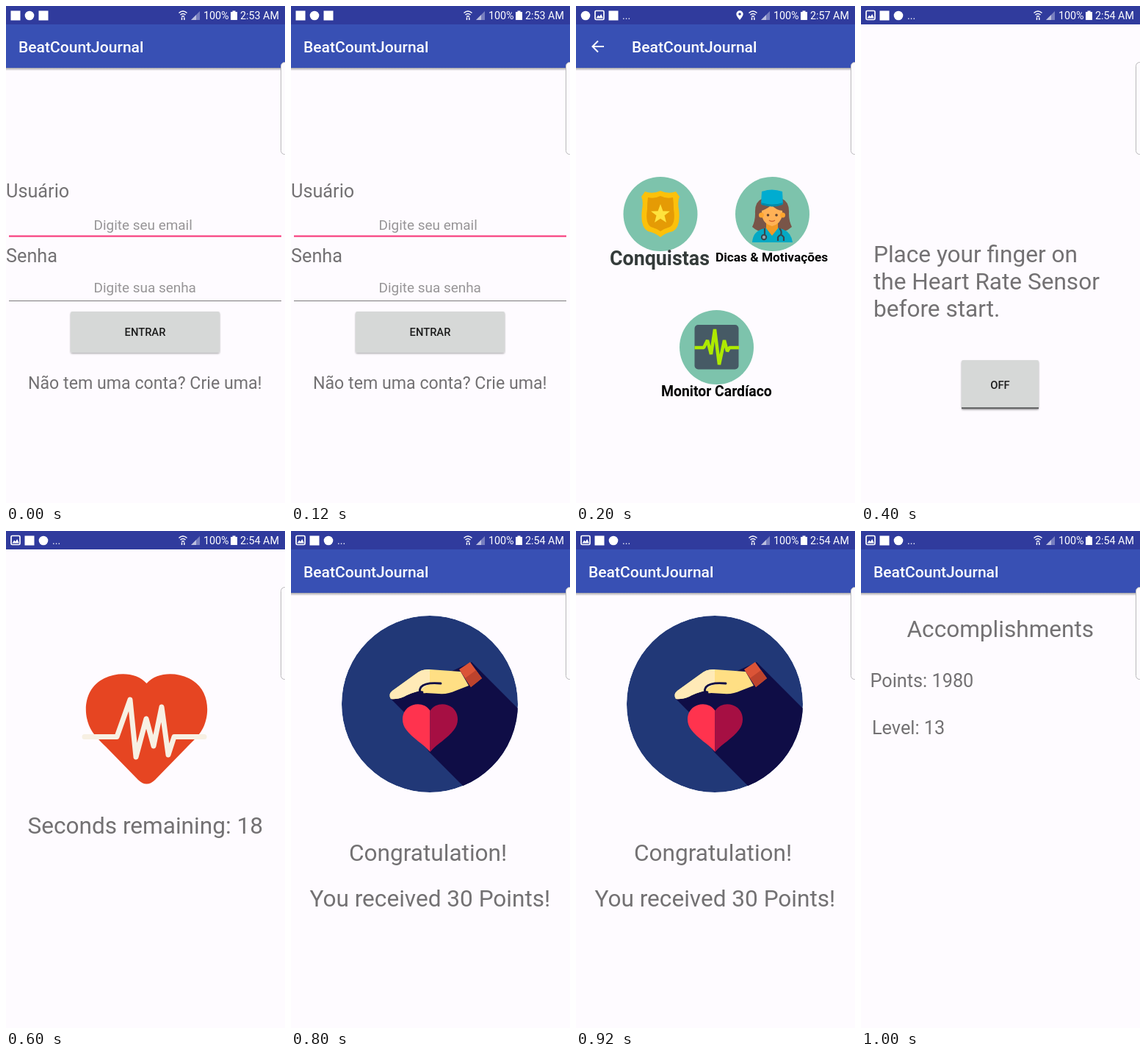
An HTML page for the animation above (1200 ms loop, 380 by 675 pixels).

```html
<!DOCTYPE html>
<html lang="pt">
<head>
<meta charset="utf-8">
<title>Pulse app tour</title>
<style>
html, body { margin: 0; width: 100%; height: 100%; overflow: hidden; background: #fefbff; }
svg { display: block; width: 380px; height: 675px; font-family: Roboto, sans-serif; }
[data-on] { display: none; }
.body { fill: #737173; }
.s18 { font-size: 18.95px; fill: #979597; }
.s22 { font-size: 23.16px; }
.s24 { font-size: 25.27px; }
.s30 { font-size: 31.58px; }
.title { font-size: 21.06px; font-weight: 500; fill: #fff; }
.button { font-size: 14.74px; font-weight: 500; fill: #1c1c1c; }
.status { font-size: 14.3px; fill: #fff; }
.label { font-weight: 700; }
</style>
</head>
<body>
<svg viewBox="0 0 380 675">
  <defs>
    <linearGradient id="shade" x2="0" y2="1">
      <stop stop-color="#000" stop-opacity=".34"/>
      <stop offset="1" stop-color="#000" stop-opacity="0"/>
    </linearGradient>
    <filter id="lift" x="-10%" y="-10%" width="120%" height="130%">
      <feDropShadow dx="0" dy="1.5" stdDeviation="1.2" flood-opacity=".35"/>
    </filter>
    <clipPath id="disc"><circle cx="189" cy="235" r="120"/></clipPath>
    <clipPath id="round"><circle cx="267.5" cy="283" r="50"/></clipPath>
    <g id="picture">
      <rect x="-6" y="-6" width="12" height="12" rx="1.5" fill="none" stroke="#fff" stroke-width="1.7"/>
      <path d="M-4.5 4 -1.8 0 0 2 2.2-1.5 4.8 4Z" fill="#fff"/>
    </g>
    <rect id="square" x="-6.5" y="-6.5" width="13" height="13" fill="#fff"/>
    <circle id="dot" r="6.3" fill="#fff"/>
  </defs>

  <rect width="380" height="675" fill="#fefbff"/>

  <!-- app bar -->
  <g data-on="0145">
    <rect y="84" width="380" height="4" fill="url(#shade)"/>
    <rect y="25" width="380" height="59" fill="#3850b4"/>
  </g>
  <text data-on="045" class="title" x="17" y="63">BeatCountJournal</text>
  <g data-on="1">
    <text class="title" x="76" y="63">BeatCountJournal</text>
    <path d="M38 55H23M30 47.5 22.5 55 30 62.5" fill="none" stroke="#fff" stroke-width="2"/>
  </g>

  <!-- status bar -->
  <rect width="380" height="25" fill="#303b9d"/>
  <g data-on="0">
    <use href="#square" x="13" y="13"/><use href="#dot" x="32" y="13"/><use href="#square" x="51" y="13"/>
  </g>
  <g data-on="1">
    <use href="#dot" x="13" y="13"/><use href="#picture" x="32" y="12.5"/><use href="#square" x="51" y="13"/>
    <path d="M223 19Q218.300 13.500 218.300 11A4.700 4.700 0 0 1 227.700 11Q227.700 13.500 223 19Z" fill="#fff"/>
    <circle cx="223" cy="11" r="1.8" fill="#303b9d"/>
  </g>
  <g data-on="2345">
    <use href="#picture" x="13" y="12.5"/><use href="#square" x="32" y="13"/><use href="#dot" x="51" y="13"/>
  </g>
  <text data-on="12345" class="status" x="63" y="18">...</text>
  <g fill="none" stroke="#fff" stroke-width="1.5">
    <path d="M235.500 9.500Q241 4.500 246.500 9.500M237.500 12Q241 9 244.500 12M239.200 14.300Q241 13 242.800 14.300"/>
    <path d="M239.500 15.500V19M242.800 15.500V19"/>
  </g>
  <path d="M252 19 264 7V19Z" fill="#fff" opacity=".35"/>
  <path d="M252 19 259 12V19Z" fill="#fff" opacity=".5"/>
  <text class="status" x="269" y="18">100%</text>
  <path d="M306 8H308.500V6.500H312.500V8H315V19H306Z" fill="#fff"/>
  <text id="clock" class="status" x="319" y="18"></text>

  <!-- sign-in -->
  <g data-on="0" class="body">
    <text class="s24" x="0" y="260">Usuário</text>
    <text class="s18" x="119.500" y="304">Digite seu email</text>
    <rect x="4" y="311.500" width="371" height="2.200" fill="#f8407f"/>
    <text class="s24" x="0" y="348">Senha</text>
    <text class="s18" x="119.500" y="389">Digite sua senha</text>
    <rect x="4" y="400" width="371" height="1" fill="#7c7a7c"/>
    <rect x="88" y="415" width="203" height="55.500" rx="2" fill="#d6d8d7" filter="url(#lift)"/>
    <text class="button" x="189.500" y="448" text-anchor="middle">ENTRAR</text>
    <text class="s22" x="30" y="519.500">Não tem uma conta? Crie uma!</text>
  </g>

  <!-- menu -->
  <g data-on="1">
    <g fill="#7dc3ac">
      <circle cx="115" cy="282.500" r="50.500"/>
      <circle cx="267.500" cy="282.500" r="50.500"/>
      <circle cx="191.500" cy="463.500" r="50.500"/>
    </g>
    <path d="M94 252Q104 256 115 251Q126 256 136 252L141 259Q138 265 140 276Q143 300 132 306Q122 308 115 314Q108 308 98 306Q87 300 90 276Q92 265 89 259Z" fill="#fcc10b"/>
    <path d="M98 260Q107 262 115 258Q123 262 132 260Q133 267 133 276Q136 295 128 300Q121 302 115 306Q109 302 102 300Q94 295 97 276Q97 267 98 260Z" fill="#e59b05"/>
    <path d="M115 269 118.400 278.500 128 278.700 120.500 284.500 123 294 115 288.700 107 294 109.500 284.500 102 278.700 111.600 278.500Z" fill="#ffe23d"/>

    <g clip-path="url(#round)">
      <path d="M253 262Q243 266 244 282Q244 292 240 300Q250 309 267 309Q284 309 294 300Q290 292 290 282Q291 266 281 262Z" fill="#795548"/>
      <path d="M240 321Q241 307 253 303L260 301H274L281 303Q293 307 295 321Z" fill="#04a9c4"/>
      <path d="M259 293H275V302L267 312 259 302Z" fill="#f29a25"/>
      <path d="M253 270H281V284Q279 296 267 299Q255 296 253 284Z" fill="#ffb156"/>
      <circle cx="252.500" cy="284" r="3.500" fill="#ffa52e"/>
      <circle cx="281.500" cy="284" r="3.500" fill="#ffa52e"/>
      <path d="M253 278Q262 275 266 270Q272 277 281 278V268H253Z" fill="#795548"/>
      <path d="M253 252Q267 247 281 252L282 269Q267 274 252 269Z" fill="#00acd0"/>
      <path d="M252 267Q267 272 282 267L281 270Q267 275 253 270Z" fill="#0089a8"/>
      <g fill="#5f402f"><circle cx="261.500" cy="284" r="1.800"/><circle cx="273" cy="284" r="1.800"/></g>
      <path d="M263 291Q267 294 271 291" fill="none" stroke="#d3612c" stroke-width="1.500"/>
      <path d="M257 302V311M277 302Q281 306 279 311M275 319V314Q279 308 283 314V319" fill="none" stroke="#37474f" stroke-width="2.200"/>
      <circle cx="256" cy="314" r="3.200" fill="#90a4ae" stroke="#37474f" stroke-width="2"/>
    </g>

    <rect x="161.500" y="433" width="60" height="60.500" rx="5" fill="#465a65"/>
    <path d="M161.500 464H174L179 454 184 473 189 439 195 487 202 454 206 469 209 464H222" fill="none" stroke="#aeea00" stroke-width="4.500" stroke-linejoin="bevel"/>

    <text class="label" x="46" y="352" font-size="26.800" fill="#343b3a">Conquistas</text>
    <text class="label" x="190" y="346.500" font-size="17.300">Dicas &amp; Motivações</text>
    <text class="label" x="116" y="529.500" font-size="19.400">Monitor Cardíaco</text>
  </g>

  <!-- sensor prompt -->
  <g data-on="2" class="body">
    <g class="s30">
      <text x="17" y="347.500">Place your finger on</text>
      <text x="17" y="384.500">the Heart Rate Sensor</text>
      <text x="17" y="421.500">before start.</text>
    </g>
    <rect x="137" y="481" width="105" height="66" rx="2" fill="#d6d8d7" filter="url(#lift)"/>
    <rect x="137" y="545" width="105" height="2.200" fill="#666768"/>
    <text class="button" x="189.500" y="520" text-anchor="middle">OFF</text>
  </g>

  <!-- measuring -->
  <g data-on="3">
    <path d="M191.500 207C178 192 153 191 134 200C109 212 104 241 113 264C118 276 126 283 136 293L180 338Q191.500 349 203 338L247 293C257 283 265 276 270 264C279 241 274 212 249 200C230 191 205 192 191.500 207Z" fill="#e64522"/>
    <path d="M107 279.500H151L169 229 177 307 191 255 201 292 212 239 221 304 229 279.500H270" fill="none" stroke="#f7f0e3" stroke-width="7" stroke-linecap="round" stroke-linejoin="round"/>
    <text class="body s30" x="29.500" y="411">Seconds remaining: 18</text>
  </g>

  <!-- reward -->
  <g data-on="4">
    <g clip-path="url(#disc)">
      <circle cx="189" cy="235" r="120" fill="#213877"/>
      <path d="M136 228 155 247 188 300 257 369H330V262L246 178Z" fill="#0f0d46"/>
    </g>
    <path d="M136 228Q132 222 138 217L170 194Q178 187 189 188L231 191 242 210 224 217Q214 222 201 221L184 220Q177 221 175 217Q163 220 154 225Q144 229 136 228Z" fill="#ffdf84"/>
    <path d="M136 228Q132 222 138 217L170 194Q178 187 189 188V207L175 217Q163 220 154 225Q144 229 136 228Z" fill="#ffeab7"/>
    <path d="M204 207Q183 205 177 212Q173 219 179 219" fill="none" stroke="#0f0d46" stroke-width="2.800" stroke-linecap="round"/>
    <path d="M229 188 244 178 260 200 245 212Z" fill="#db5437"/>
    <path d="M237 200 252 189 260 200 245 212Z" fill="#bd432d"/>
    <path d="M189.500 244C182 233 168 233 159 240C150 248 150 261 157 270C166 282 180 289 189.500 300Z" fill="#ff334e"/>
    <path d="M189.500 244C197 233 211 233 220 240C229 248 229 261 222 270C213 282 199 289 189.500 300Z" fill="#a60f43"/>
    <g class="body s30">
      <text x="79" y="448">Congratulation!</text>
      <text x="25.500" y="510">You received 30 Points!</text>
    </g>
  </g>

  <!-- summary -->
  <g data-on="5" class="body">
    <text class="s30" x="62.500" y="143.500">Accomplishments</text>
    <text class="s24" x="12.500" y="212">Points: 1980</text>
    <text class="s24" x="15" y="276">Level: 13</text>
  </g>

  <!-- edge handle -->
  <rect x="374.500" y="76.500" width="14" height="125" rx="5" fill="#fdfbfe" stroke="#b9b8bb"/>
</svg>
<script>
const STEP = 200;
const minutes = [53, 57, 54, 54, 54, 54];
const parts = document.querySelectorAll('[data-on]');
const clock = document.getElementById('clock');
const start = performance.now();
let shown = -1;

function draw() {
  const scene = Math.floor((performance.now() - start) / STEP) % minutes.length;
  if (scene !== shown) {
    shown = scene;
    for (const part of parts) {
      part.style.display = part.dataset.on.includes(scene) ? 'inline' : 'none';
    }
    clock.textContent = `2:${minutes[scene]} AM`;
  }
  requestAnimationFrame(draw);
}
draw();
</script>
</body>
</html>
```
